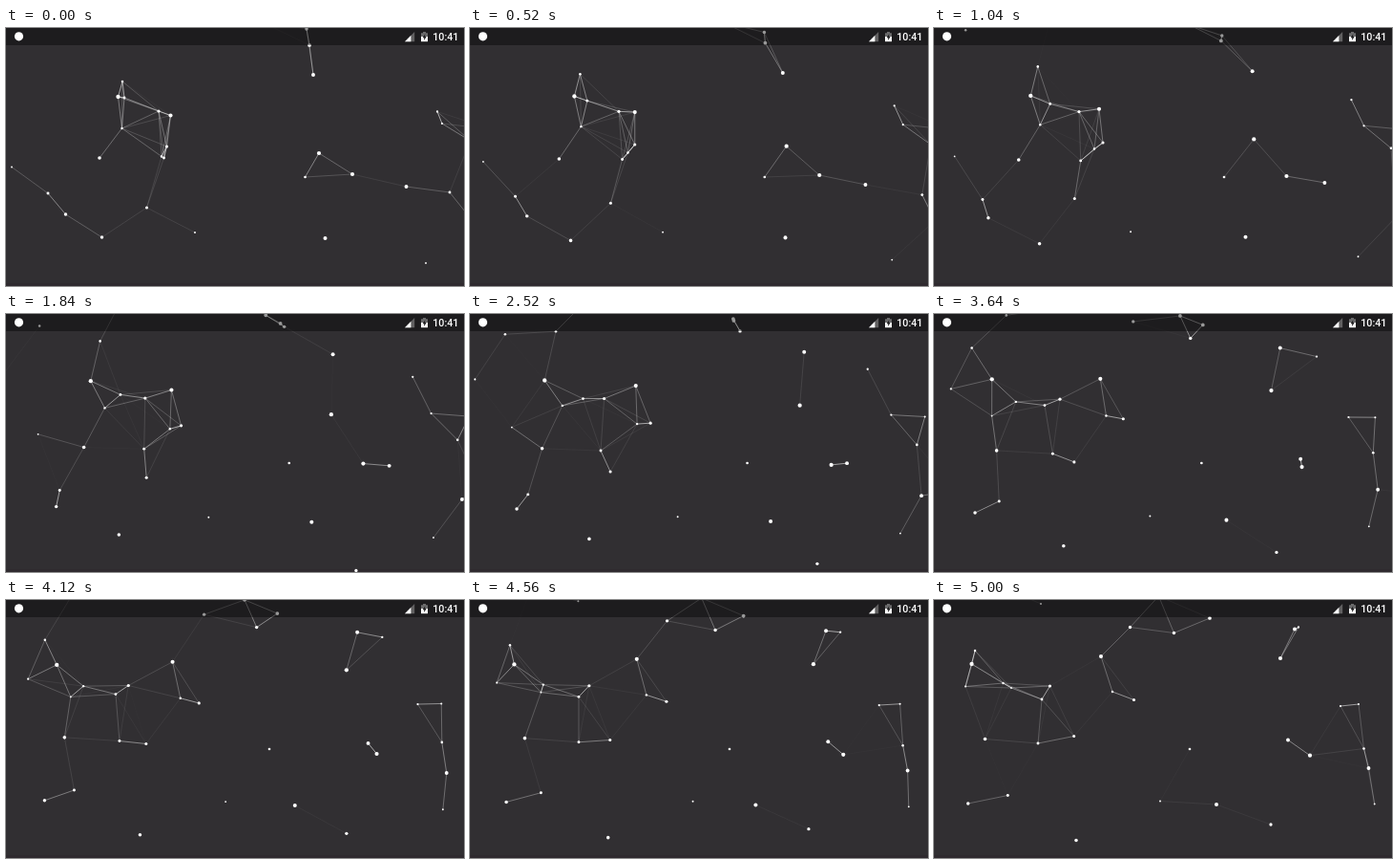
These frames come from a looping animation (480x270 px, 5040 ms). An HTML page:

```html
<!DOCTYPE html>
<html lang="en">
<head>
<meta charset="utf-8">
<title>Particle network</title>
<style>
html, body { margin: 0; width: 100%; height: 100%; overflow: hidden; background: #312f32; }
svg { display: block; width: 100vw; height: 100vh; }
text { font: 500 10.7px Roboto, sans-serif; }
</style>
</head>
<body>
<svg viewBox="0 0 480 270">
  <rect width="480" height="270" fill="#312f32"/>
  <rect y="267" width="480" height="3" fill="#2f2a2f"/>
  <g id="lines" stroke="#fff" stroke-width=".75"></g>
  <g id="dots" fill="#fff"></g>
  <rect width="480" height="18" opacity=".4"/>
  <g fill="#fff">
    <circle cx="13.5" cy="8.8" r="4.6"/>
    <path d="M418 14.2H428.2V4Z" opacity=".3"/>
    <path d="M418 14.2H424.4V7.8Z"/>
    <path d="M435 5.2H437V4H440V5.2H442V9H435Z" opacity=".35"/>
    <path d="M435 9H442V14.2H435Z"/>
    <path d="M439.2 6.2L436.6 10.3H438.2V13L440.6 9H439.2Z" fill="#1d1c1e"/>
    <text x="447.3" y="13">10:41</text>
  </g>
</svg>
<script>
const LOOP = 5040, STEP = 40, SPAN = 5000;
const REACH = 64.5, BIG = 2.15, SMALL = 0.9;

// Start and end point of each drift, ordered from the biggest dot to the smallest
const drifts = [
  [117.5, 72, 39.5, 67], [328, 131, 363, 61], [363, 153, 394, 162.7],
  [172.5, 91.5, 175, 59], [334.5, 220, 296, 214], [322, 49, 378, 30.6],
  [419.5, 166, 371, 146.5], [491, 204.5, 455.5, 176], [318, 18, 235.5, -4],
  [262.5, -9, 289, 19], [98, 136, 53.5, 145.5], [100.5, 219, 149, 251.5],
  [62.5, 195, 35.7, 213], [315, 1, 251.5, 34.5], [217.5, -47, 205.5, 28.5],
  [375, 288, 353, 235], [160, 87, 121.5, 90], [168.5, 124, 209.5, 104.5],
  [147.5, 188, 146.7, 142.5], [44, 173, 77.3, 204.5], [165.5, 136, 109, 150],
  [465, 172, 550, 197], [124, 73, 113, 104], [313.5, 156, 268, 156],
  [486.5, 118, 450.5, 155.5], [122, 56, 58.5, -19], [30.5, -11, 43, 53],
  [163, 134.5, 187, 96], [121.5, 105, 72.5, 87], [452, 87.5, 382, 28.5],
  [457, 100, 426, 111], [-23, 46, 33, 90.5], [509, 106, 445, 109],
  [128, -28.5, 112, 4], [198, 214, 237, 210.5], [440, 246, 461.7, 213.5],
  [6, 145.5, 81, 92]
];
const lines = document.getElementById("lines");
const dots = document.getElementById("dots");
const mix = (a, b, k) => a + (b - a) * k;
const fix = n => n.toFixed(2);

const dot = p => `<circle cx="${fix(p.x)}" cy="${fix(p.y)}" r="${fix(p.r)}"/>`;

// Links fade out linearly with distance
function link(a, b) {
  const fade = 1 - Math.hypot(a.x - b.x, a.y - b.y) / REACH;
  if (fade <= 0) return "";
  return `<line x1="${fix(a.x)}" y1="${fix(a.y)}" x2="${fix(b.x)}" y2="${fix(b.y)}" opacity="${fix(fade)}"/>`;
}

function draw(ms) {
  const k = ms / SPAN;
  const pts = drifts.map(([x, y, u, v], i) => ({
    x: mix(x, u, k),
    y: mix(y, v, k),
    r: mix(BIG, SMALL, i / (drifts.length - 1))
  }));
  lines.innerHTML = pts.flatMap((a, i) => pts.slice(i + 1).map(b => link(a, b))).join("");
  dots.innerHTML = pts.map(dot).join("");
}

const start = performance.now();
let shown = -1;
function tick() {
  const t = (performance.now() - start) % LOOP;
  const ms = Math.floor(t / STEP) * STEP;
  if (ms !== shown) draw(shown = ms);
  requestAnimationFrame(tick);
}
tick();
</script>
</body>
</html>
```
